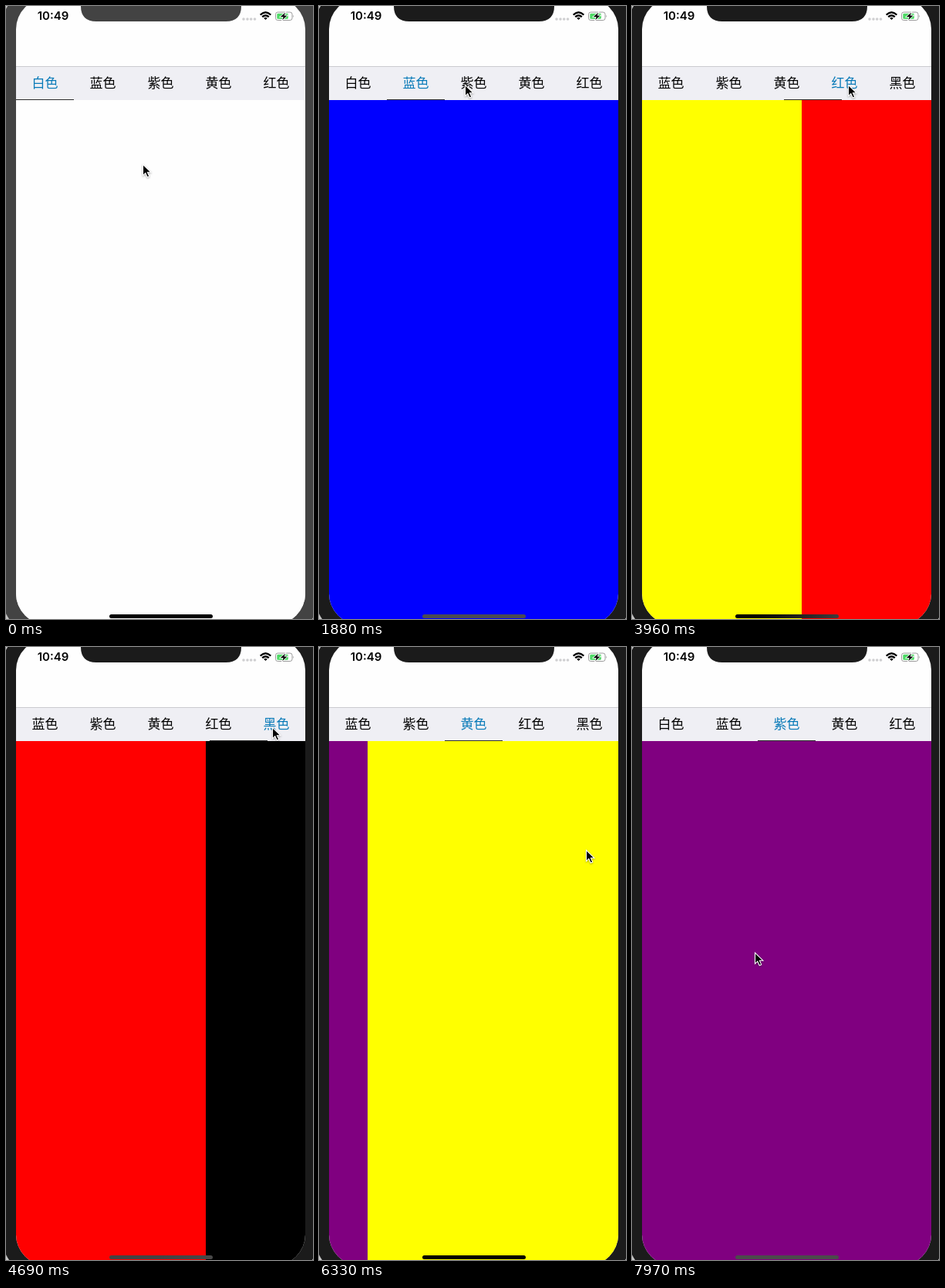
Write an HTML page that moves like this. It is 398x795 px and loops after 8000 ms.

```html
<!DOCTYPE html>
<html lang="zh">
<head>
<meta charset="utf-8">
<title>Tab pager</title>
<style>
  html, body { margin: 0; width: 100%; height: 100%; overflow: hidden; }
  #stage { position: relative; width: 398px; height: 795px; overflow: hidden; background: #c6c6c6; }
  #stage * { position: absolute; box-sizing: border-box; }
  #body { left: -6px; top: -29px; width: 413px; height: 850px; border-radius: 59px; background: var(--bezel); }
  #screen { inset: 0; background: #fefefe; clip-path: inset(-10px 10px -7px 13px round 40px); }
  #pages { left: 13px; top: 122px; height: 680px; }
  #pages div { width: 375px; height: 680px; }
  #bar { left: 13px; top: 78px; width: 375px; height: 44px; background: #efeff4; border-top: 1px solid #cbcbcf; }
  #tabs { left: 0; top: -1px; }
  #tabs span {
    width: 75px; height: 44px; text-align: center; color: #000;
    font: 17px/42px "Noto Sans CJK SC", "Noto Sans CJK", sans-serif;
  }
  #tabs .on { color: #087ab8; }
  #line { left: 0; top: 43px; width: 75px; height: 1px; background: #2b2b2b; }
  #home {
    left: 134px; top: 789px; width: 134px; height: 5px; border-radius: 3px;
    background-size: 2250px 5px;
  }
  svg { left: 0; top: 0; overflow: visible; }
  #status text { font: 600 15px Inter, sans-serif; }
</style>
</head>
<body>
<div id="stage">
  <div id="body"></div>
  <div id="screen">
    <div id="pages"></div>
    <div id="bar"><div id="tabs"><div id="line"></div></div></div>
    <div id="home"></div>
    <svg id="status" width="398" height="40">
      <path d="M96.500-10V0A20 20 0 0 0 116.500 20H285A20 20 0 0 0 305-10V-10Z" fill="none"/>
      <path id="notch" d="M97-10V0Q97 20 117 20H285Q305 20 305 0V-10Z" fill="var(--bezel)"/>
      <text x="61" y="18" text-anchor="middle">10:49</text>
      <g fill="#cfcfd1">
        <circle cx="308" cy="17" r="1.8"/><circle cx="313" cy="17" r="1.8"/>
        <circle cx="317.700" cy="17" r="1.8"/><circle cx="322.500" cy="17" r="1.8"/>
      </g>
      <g fill="none" stroke="#000" stroke-width="2.3">
        <path d="M329.700 11.500Q336.500 5 343.300 11.500M332.200 14.200Q336.500 10.200 340.800 14.200"/>
        <path d="M334.200 15.700Q336.500 14 338.800 15.700L336.500 18Z" fill="#000" stroke="none"/>
      </g>
      <rect x="349.500" y="8" width="21.500" height="10.500" rx="2.800" fill="#fff" stroke="#9b9b9b"/>
      <path d="M372.300 11.500Q374 13.200 372.300 15Z" fill="#9b9b9b"/>
      <rect x="351.300" y="9.800" width="14.500" height="7" rx="1.300" fill="#4cd964"/>
      <path d="M362 8.500L355.800 14H359.600L358.300 18L364.500 12.400H360.700Z" stroke="#fff" stroke-width="1.600" paint-order="stroke"/>
    </svg>
  </div>
  <svg id="cursor" width="14" height="20">
    <path d="M.5 .5V14.800L3.800 11.700L6.200 17L8.700 15.900L6.400 10.700H10.900Z"
      stroke="#fff" stroke-width="1.100" style="filter:drop-shadow(0 1px 1px #0005)"/>
  </svg>
</div>
<script>
const LOOP = 8000, STEP = 148.3, SYNC = 1129;
const PAGE_W = 375, TAB_W = 75;
const $ = id => document.getElementById(id);

// name, page colour, home bar colour
const items = [
  ['白', '#fefefe', '#000'], ['蓝', '#00f', '#4b4b52'], ['紫', '#800080', '#4b4b4b'],
  ['黄', '#ff0', '#000'], ['红', '#f00', '#444'], ['黑', '#000', '#4b4b4b']
];
const tabs = items.map(([name, color], i) => {
  const page = document.createElement('div');
  page.style.cssText = `left:${i * PAGE_W}px;background:${color}`;
  $('pages').append(page);
  const tab = document.createElement('span');
  tab.textContent = name + '色';
  tab.style.left = i * TAB_W + 'px';
  $('tabs').insertBefore(tab, $('line'));
  return tab;
});
$('home').style.backgroundImage = `linear-gradient(90deg,${items.map(([, , c], i) =>
  `${c} ${i * PAGE_W + 60}px ${(i + 1) * PAGE_W - 60}px`)})`;

const ease = u => (u = Math.min(1, Math.max(0, u)), u * u * (3 - 2 * u));
// moves: [start, duration, target]
const track = (from, moves) => t =>
  moves.reduce((v, [at, dur, to]) => v + (to - v) * ease((t - at) / dur), from);

const taps = [[1047, 1], [2100, 2], [2840, 3], [3807, 4], [4570, 5], [5365, 3]];
const slides = taps.map(([at, to]) => [at, 300, to]);
const picks = [...taps, [6800, 2]];

const pageAt = track(0, [...slides, [6200, 520, 2]]);
const lineAt = track(0, [...slides, [6800, 300, 2]]);
const stripAt = track(0, [[2792, 300, 75], [6800, 300, 0]]);

// start, duration, x, y
const path = [
  [60, 820, 124, 103], [1200, 665, 189, 102], [2190, 415, 274, 105], [3080, 650, 280, 102],
  [4000, 440, 345, 104], [4690, 435, 210, 99], [5540, 470, 296, 263], [6200, 118, 346, 263],
  [6330, 150, 360, 264], [6950, 400, 343, 263], [7400, 100, 352, 263], [7700, 240, 159, 396]
];
const cursorX = track(177, path.map(([at, dur, x]) => [at, dur, x]));
const cursorY = track(205, path.map(([at, dur, , y]) => [at, dur, y]));

const move = (el, x, y = 0) => { el.style.transform = `translate(${Math.round(x)}px,${Math.round(y)}px)`; };
const hold = t => {
  const base = t < SYNC ? 0 : SYNC;
  return base + Math.floor((t - base) / STEP) * STEP;
};

function draw(t) {
  const scroll = pageAt(t) * PAGE_W;
  move($('pages'), -scroll);
  move($('tabs'), -stripAt(t));
  move($('line'), lineAt(t) * TAB_W);
  move($('cursor'), cursorX(t), cursorY(t));
  $('home').style.backgroundPositionX = -121 - scroll + 'px';
  const chosen = picks.reduce((now, [at, to]) => t >= at ? to : now, 0);
  tabs.forEach((tab, i) => tab.classList.toggle('on', i === chosen));
  $('stage').style.setProperty('--bezel', t < 800 ? '#434343' : '#1b1b1b');
}

const start = performance.now();
function tick() {
  draw(hold((performance.now() - start) % LOOP));
  requestAnimationFrame(tick);
}
tick();
</script>
</body>
</html>
```
